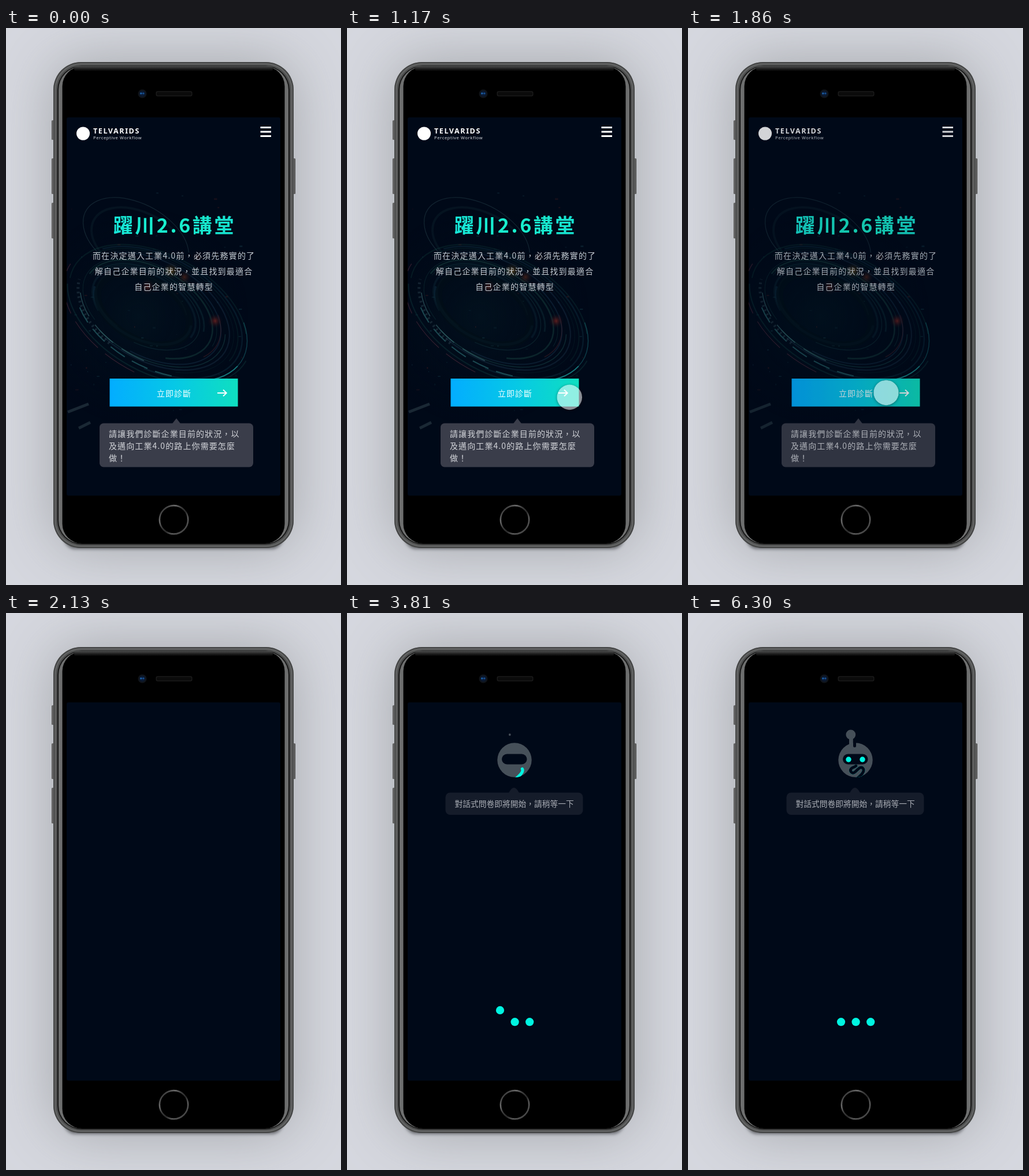
An HTML page with a canvas for the animation above (6330 ms loop, 580 by 966 pixels).

```html
<!DOCTYPE html>
<html lang="zh-Hant">
<head>
<meta charset="utf-8">
<title>Phone prototype</title>
<style>
html, body { margin: 0; width: 100%; height: 100%; overflow: hidden; background: #d6d8df; }
canvas { display: block; }
</style>
</head>
<body>
<canvas id="stage" width="580" height="966"></canvas>
<script>
const W = 580, H = 966, LOOP = 6330;
const NAVY = '#000918', TEAL = '#00f5e1', GREY = '#465059';
const CJK = '"Noto Sans CJK TC", "Noto Sans CJK", sans-serif';
const ctx = document.getElementById('stage').getContext('2d');

const clamp = v => Math.max(0, Math.min(1, v));
const part = (t, from, to) => clamp((t - from) / (to - from));
const easeOut = p => 1 - (1 - p) ** 3;
const easeInOut = p => p < .5 ? 4 * p ** 3 : 1 - (2 - 2 * p) ** 3 / 2;

function layer(draw) {
  const c = document.createElement('canvas');
  c.width = W;
  c.height = H;
  draw(c.getContext('2d'));
  return c;
}

function box(g, x, y, w, h, r, fill) {
  g.beginPath();
  g.roundRect(x, y, w, h, r);
  g.fillStyle = fill;
  g.fill();
}

function disc(g, x, y, r, fill) {
  g.beginPath();
  g.arc(x, y, Math.max(0, r), 0, 7);
  g.fillStyle = fill;
  g.fill();
}

function ramp(g, x0, y0, x1, y1, colors) {
  const grad = g.createLinearGradient(x0, y0, x1, y1);
  colors.forEach((c, i) => grad.addColorStop(i / (colors.length - 1), c));
  return grad;
}

function glow(g, x, y, r, color) {
  const grad = g.createRadialGradient(x, y, 0, x, y, r);
  grad.addColorStop(0, color);
  grad.addColorStop(1, 'rgba(0,9,24,0)');
  disc(g, x, y, r, grad);
}

function label(g, str, x, y, font, fill, gap = 0, align = 'left') {
  g.font = font;
  g.letterSpacing = gap + 'px';
  g.textBaseline = 'middle';
  g.textAlign = 'left';
  g.fillStyle = fill;
  const left = align === 'center' ? x - (g.measureText(str).width - gap) / 2 : x;
  g.fillText(str, left, y);
  g.letterSpacing = '0px';
}

function drawPhone(g) {
  g.fillStyle = '#d6d8df';
  g.fillRect(0, 0, W, H);
  g.save();
  g.shadowColor = 'rgba(132,135,138,.62)';
  g.shadowBlur = 100;
  box(g, 82, 59, 416, 843, 48, '#777');
  g.restore();
  g.save();
  g.shadowColor = 'rgba(60,62,68,.6)';
  g.shadowBlur = 5;
  g.shadowOffsetY = 3;
  box(g, 100, 860, 380, 41, 36, '#666');
  g.restore();

  const sideKey = (x, y, h) => box(g, x, y, 5, h, 1.5, ramp(g, x, 0, x + 5, 0, ['#444', '#777', '#333']));
  sideKey(79, 160, 34);
  sideKey(79, 226, 62);
  sideKey(79, 303, 62);
  sideKey(496, 226, 62);

  box(g, 82, 59, 416, 843, 48, '#434444');
  box(g, 84, 61, 412, 839, 46, '#626363');
  box(g, 86.5, 63.5, 407, 834, 44, '#4c4d4d');
  box(g, 89, 65.5, 402, 830, 42, '#151515');
  const metal = ramp(g, 91, 0, 489, 0, ['#6c6d6d', '#929393', '#808181', '#929393', '#6c6d6d']);
  box(g, 91, 67, 398, 827, 40, metal);
  box(g, 97.5, 67, 385, 827, 34, '#000');
  box(g, 118, 66, 344, 9, 4, ramp(g, 0, 66, 0, 75, ['#4b4c4c', '#222', '#000']));

  disc(g, 236, 114, 7.5, '#10141a');
  disc(g, 236, 114, 5, '#0a1a33');
  disc(g, 233.8, 113.5, 1.7, '#1c5ca0');
  disc(g, 237.8, 113.5, 1.7, '#174a88');
  box(g, 259.5, 109.5, 63, 9, 3, '#1a1a1a');
  box(g, 261, 111, 60, 6, 2, '#0b0b0b');

  g.lineWidth = 2.6;
  g.strokeStyle = ramp(g, 272, 834, 309, 871, ['#383838', '#6c6c6c', '#3a3a3a', '#2a2a2a', '#5c5c5c', '#444']);
  g.beginPath();
  g.arc(290.5, 852.8, 24.7, 0, 7);
  g.stroke();
  box(g, 105, 155, 370, 656, 3, NAVY);
}

function drawScenery(g) {
  let seed = 11;
  const rnd = () => (seed = seed * 16807 % 2147483647) / 2147483647;
  g.save();
  g.beginPath();
  g.rect(105, 155, 370, 656);
  g.clip();
  glow(g, 230, 500, 190, 'rgba(4,26,36,.5)');

  const ring = (x, y, size, from, to, width, color, dash = []) => {
    g.beginPath();
    g.ellipse(x, y, 165 * size, 100 * size, .5, from, to);
    g.lineWidth = width;
    g.strokeStyle = color;
    g.setLineDash(dash);
    g.stroke();
  };
  ring(225, 365, .6, 2, 5.9, 1.3, 'rgba(60,100,108,.3)');
  ring(232, 376, .55, 2.2, 5.2, 4, 'rgba(30,66,74,.18)');

  // Broken concentric rims, closer to the centre as they shrink.
  for (let i = 0; i < 16; i++) {
    const size = 1.04 - i * .035, from = rnd() * 6.3;
    ring(265 - i * 2, 495 - i * .8, size, from, from + 1.5 + rnd() * 3, 1 + rnd() * 4,
      `rgba(${26 + rnd() * 16},${72 + rnd() * 30},${82 + rnd() * 22},${.12 + rnd() * .2})`);
  }
  ring(238, 488, .52, 0, 6.3, 12, 'rgba(2,15,24,.7)');
  ring(265, 495, 1, -.6, .15, 1.4, 'rgba(30,130,135,.45)');
  ring(265, 495, 1, .15, .85, 2, 'rgba(35,175,172,.65)');
  ring(265, 495, .95, 1.1, 2.5, 2, 'rgba(60,150,150,.45)', [30, 14]);
  ring(258, 492, .85, 1.4, 2.9, 1.5, 'rgba(90,160,160,.4)', [44, 18]);
  ring(262, 498, 1.06, 1.5, 3.2, 1.2, 'rgba(120,58,78,.42)', [60, 16]);
  ring(250, 485, .8, -.6, .4, 1.2, 'rgba(110,48,54,.35)');
  ring(262, 495, .9, 1.9, 3, 5, 'rgba(90,130,135,.22)', [3, 5]);

  for (let i = 0; i < 55; i++) {
    const x = 108 + rnd() * 300, y = 285 + rnd() * 380;
    g.fillStyle = `rgba(${i % 5 ? 40 : 110},${i % 5 ? 100 : 45},${i % 5 ? 110 : 40},${.1 + rnd() * .2})`;
    g.fillRect(x, y, 1 + rnd() * 5, 1 + rnd() * 2);
  }
  glow(g, 362, 508, 14, 'rgba(140,38,30,.65)');
  glow(g, 245, 449, 15, 'rgba(130,45,28,.5)');
  glow(g, 286, 421, 16, 'rgba(150,105,25,.5)');
  glow(g, 309, 432, 14, 'rgba(135,55,25,.45)');
  glow(g, 332, 397, 12, 'rgba(100,40,30,.3)');

  g.setLineDash([]);
  g.lineWidth = 5;
  g.strokeStyle = 'rgba(75,100,106,.35)';
  g.beginPath();
  g.moveTo(107, 666);
  g.lineTo(143, 652);
  g.moveTo(126, 694);
  g.lineTo(146, 684);
  g.stroke();
  g.restore();
}

function drawPage(g) {
  drawScenery(g);
  disc(g, 133.5, 183, 11.5, '#fff');
  label(g, 'TELVARIDS', 151, 179.5, 'bold 12.5px "Noto Sans", sans-serif', '#fff', 1.6);
  label(g, 'Perceptive Workflow', 151, 190.5, '7.5px "Noto Sans", sans-serif', '#d5d8dd', .65);
  for (const y of [171, 178.5, 186]) box(g, 440.5, y, 18.5, 3, 0, '#fff');

  label(g, '躍川2.6講堂', 290, 342, 'bold 34px ' + CJK, ramp(g, 183, 0, 397, 0, ['#16e6d8', '#18f0cc', '#16e0d0']), 3.6, 'center');
  ['而在決定邁入工業4.0前，必須先務實的了', '解自己企業目前的狀況，並且找到最適合', '自己企業的智慧轉型']
    .forEach((s, i) => label(g, s, 290, 394.5 + i * 27, '14px ' + CJK, '#c3c9d0', 1.2, 'center'));

  box(g, 179.5, 608, 222, 48.5, 0, ramp(g, 180, 0, 402, 0, ['#03adff', '#06c8e6', '#0fdfc0']));
  label(g, '立即診斷', 290.5, 633.5, '500 14px ' + CJK, '#f2ffff', 1, 'center');
  g.lineWidth = 1.8;
  g.strokeStyle = '#fff';
  g.beginPath();
  g.moveTo(366, 633);
  g.lineTo(381.5, 633);
  g.moveTo(376, 627.5);
  g.lineTo(381.8, 633);
  g.lineTo(376, 638.5);
  g.stroke();

  box(g, 162, 685.5, 266, 76, 7, '#3a3d4a');
  g.beginPath();
  g.moveTo(288, 686);
  g.lineTo(295, 677);
  g.lineTo(302, 686);
  g.fill();
  ['請讓我們診斷企業目前的狀況，以', '及邁向工業4.0的路上你需要怎麼', '做！']
    .forEach((s, i) => label(g, s, 178, 704 + i * 21, '14px ' + CJK, '#d3d5da', 1.1));
}

function drawHint(g) {
  box(g, 170.5, 311.5, 238, 38.5, 8, '#151c2a');
  g.beginPath();
  g.moveTo(280, 312);
  g.quadraticCurveTo(289, 294, 298, 312);
  g.fill();
  label(g, '對話式問卷即將開始，請稍等一下', 289.7, 331, '13.75px ' + CJK, '#a9adb5', 0, 'center');
}

const phone = layer(drawPhone), page = layer(drawPage), hint = layer(drawHint);
const mouth = new Path2D('M293 287 C300 281 306 275 303.5 270.5 C300 264 294 271 290 275 C285 280 279 275 282.5 270 C285 267 288 268 291 265');
const MOUTH_LENGTH = 62;

function drawCursor(t) {
  if (t < 690 || t >= 2130) return;
  const p = easeInOut(part(t, 690, 1590)), q = 1 - p;
  const away = part(t, 1830, 2130) ** 2;
  const x = q * q * 454 + 2 * p * q * 394 + p * p * 342 + away * 98;
  const y = q * q * 706 + 2 * p * q * 624 + p * p * 632.5 - away * 5;
  ctx.save();
  ctx.beginPath();
  ctx.rect(105, 155, 370, 656);
  ctx.clip();
  ctx.globalAlpha = part(t, 690, 840) * (1 - part(t, 1980, 2130));
  disc(ctx, x, y, 21.8, 'rgba(255,255,255,.54)');
  // The shadow falls outside the translucent disc only.
  ctx.beginPath();
  ctx.rect(0, 0, W, H);
  ctx.arc(x, y, 21.8, 0, 7);
  ctx.clip('evenodd');
  ctx.shadowColor = 'rgba(0,0,0,.45)';
  ctx.shadowBlur = 5;
  ctx.shadowOffsetY = 1;
  disc(ctx, x, y, 21.4, '#000');
  ctx.restore();
}

function strokeMouth(color, p) {
  if (p <= 0) return;
  ctx.strokeStyle = color;
  ctx.setLineDash([MOUTH_LENGTH * p, 200]);
  ctx.stroke(mouth);
  ctx.setLineDash([]);
}

function drawRobot(t) {
  const size = t < 3060 ? 1.18 * easeOut(part(t, 2790, 3060)) : 1.18 - .18 * easeInOut(part(t, 3060, 3330));
  ctx.save();
  ctx.translate(290, 255);
  ctx.scale(size, size);
  ctx.translate(-290, -255);
  disc(ctx, 290, 255, 29.7, GREY);
  ctx.save();
  ctx.beginPath();
  ctx.arc(290, 255, 30.3, 0, 7);
  ctx.clip();
  ctx.lineWidth = 5.2;
  ctx.lineCap = 'round';
  strokeMouth(TEAL, part(t, 3660, 4110));
  strokeMouth(NAVY, part(t, 3900, 4380));
  ctx.restore();
  box(ctx, 268, 244.5, 43.5, 18, 9, NAVY);

  disc(ctx, 281.8, 211, 8.4 * easeOut(part(t, 3790, 4050)), GREY);
  const stem = easeOut(part(t, 4020, 4290));
  if (stem > 0) {
    box(ctx, 286, 222, 5, 11 * stem, 2.5, NAVY);
    box(ctx, 279, 217, 6.8, 19 * stem, 1, GREY);
  }
  const eye = easeOut(part(t, 4320, 4590));
  disc(ctx, 278, 254, 4.7 * eye, TEAL);
  disc(ctx, 302, 254, 4.7 * eye, TEAL);
  ctx.restore();
}

function drawDots(t) {
  for (let i = 0; i < 3; i++) {
    const phase = ((t - 3610 - i * 200) % 1400 + 1400) % 1400;
    const lift = phase < 400 ? 20.3 * Math.sin(Math.PI * phase / 400) ** 2 : 0;
    disc(ctx, 265 + i * 25.6, 709.2 - lift, 7.1, TEAL);
  }
}

function render(t) {
  ctx.globalAlpha = 1;
  ctx.drawImage(phone, 0, 0);
  if (t < 2010) {
    ctx.globalAlpha = 1 - part(t, 1830, 2010);
    ctx.drawImage(page, 0, 0);
    ctx.globalAlpha = 1;
  }
  drawCursor(t);
  if (t < 2790) return;
  ctx.globalAlpha = part(t, 2790, 3210);
  ctx.drawImage(hint, 0, 0);
  drawDots(t);
  drawRobot(t);
}

const start = performance.now();
function tick() {
  render((performance.now() - start) % LOOP);
  requestAnimationFrame(tick);
}
tick();
</script>
</body>
</html>
```
